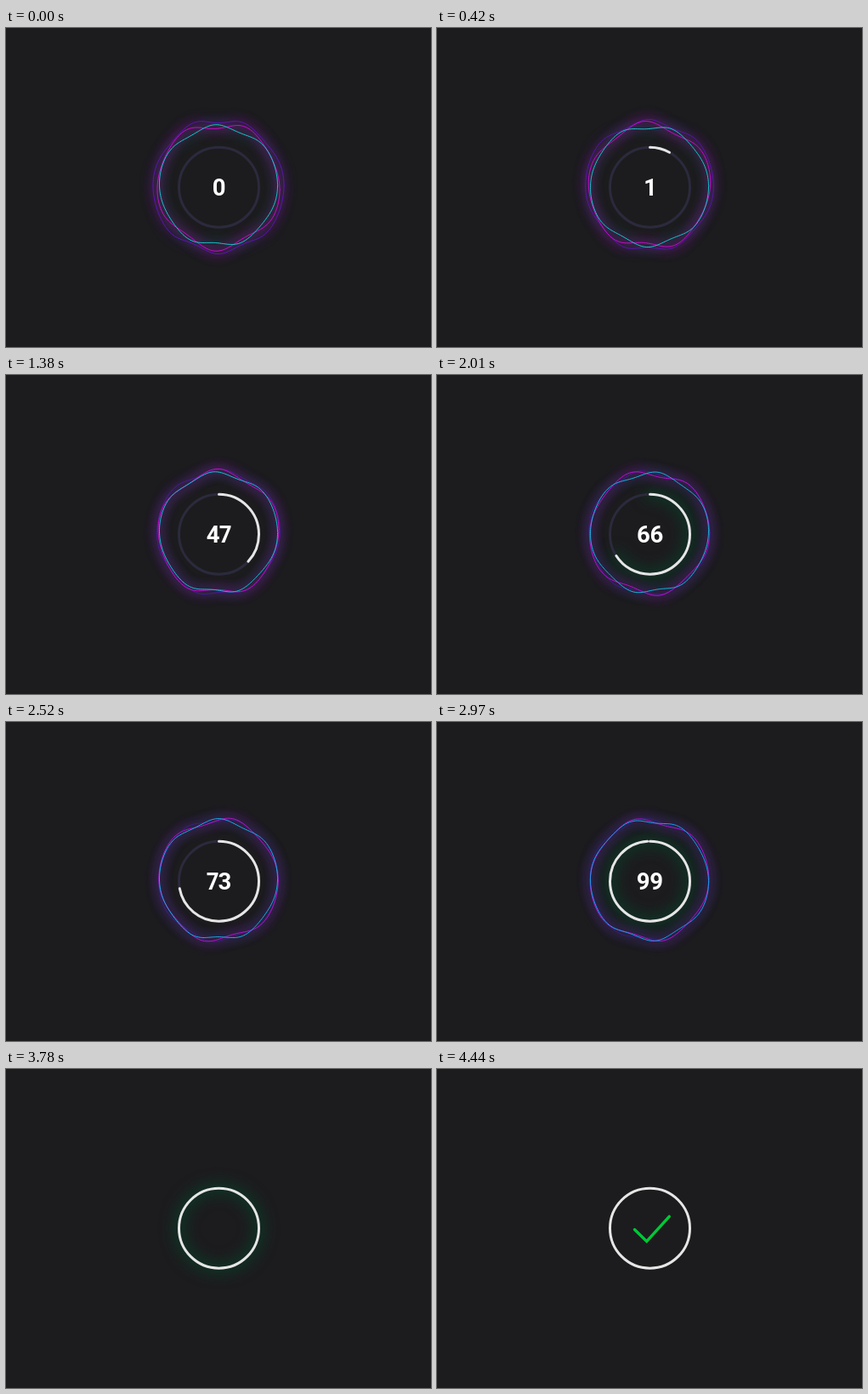
These frames come from a looping animation (500 by 375 pixels, 5.1 s). An HTML page with a canvas:

```html
<!DOCTYPE html>
<html lang="en">
<head>
<meta charset="utf-8">
<title>Progress ring</title>
<style>
  html, body { margin: 0; width: 100%; height: 100%; overflow: hidden; background: #1c1c1e; }
  canvas, svg { position: absolute; left: 0; top: 0; width: 500px; height: 375px; }
  text {
    font: 700 27.5px Roboto, "Noto Sans", sans-serif; font-variant-numeric: proportional-nums;
    letter-spacing: -.7px; fill: #fff; text-anchor: middle;
  }
</style>
</head>
<body>
<canvas id="stage" width="500" height="375"></canvas>
<svg viewBox="0 0 500 375"><text id="count" x="250.2" y="196.5">0</text></svg>
<script>
const LOOP = 5100, STEP = 30, TAU = Math.PI * 2, OFF = 2000;
const RING = { x: 250.5, y: 187.2, r: 47 };
const canvas = document.getElementById('stage');
const ctx = canvas.getContext('2d');
const count = document.getElementById('count');
const ratio = window.devicePixelRatio || 1;
canvas.width = 500 * ratio;
canvas.height = 375 * ratio;

const clamp = v => Math.min(1, Math.max(0, v));
const span = (t, from, to) => clamp((t - from) / (to - from));
const mix = (a, b, u) => a + (b - a) * u;
const quad = u => u < .5 ? 2 * u * u : 1 - 2 * (1 - u) ** 2;
const cubic = u => u < .5 ? 4 * u ** 3 : 1 - 4 * (1 - u) ** 3;

// start, end and target percentage of each push of the bar
const PUSHES = [[25, 1025, 33], [1070, 2070, 66], [2165, 3165, 100]];

// crest: x of an upward crest at t = 0; wave: length in px; period: ms per wave
const BLOBS = [
  { from: [98, 20, 195], to: [50, 45, 225], r: [77, 70], pow: 2, amp: [3, 2.4],
    crest: 280, wave: 60, period: 880, alpha: [.9, .3], glow: .2 },
  { from: [205, 12, 205], to: [184, 22, 214], r: [72, 69.5], pow: 1, amp: [4.7, 3.6],
    crest: 284, wave: 75, period: 904, alpha: [1, .95], glow: .36 },
  { from: [18, 205, 205], to: [18, 158, 250], r: [69.5, 69.5], pow: 1, amp: [2.5, 2.5],
    crest: 246, wave: 60, period: 278, alpha: [1, 1], glow: .15 }
];

const rgba = (c, a) => `rgba(${c.map(Math.round).join(',')},${a})`;

// Strokes the path outside the stage so only its blurred shadow lands on it.
function halo(path, color, width, blur) {
  ctx.save();
  ctx.shadowColor = color;
  ctx.shadowBlur = blur * ratio;
  ctx.shadowOffsetX = OFF * ratio;
  ctx.translate(-OFF, 0);
  ctx.lineWidth = width;
  ctx.strokeStyle = '#000';
  ctx.stroke(path);
  ctx.restore();
}

function line(path, color, width) {
  ctx.lineWidth = width;
  ctx.strokeStyle = color;
  ctx.stroke(path);
}

// A circle whose points are shifted up and down by a wave running to the right.
function blobPath(b, t, u) {
  const path = new Path2D();
  const r = mix(b.r[0], b.r[1], u), amp = mix(b.amp[0], b.amp[1], u);
  for (let i = 0; i < 240; i++) {
    const a = i / 240 * TAU;
    const x = 250 + r * Math.cos(a);
    const shift = amp * Math.cos(((x - b.crest) / b.wave - t / b.period) * TAU);
    path.lineTo(x, 185.6 + r * Math.sin(a) - shift);
  }
  path.closePath();
  return path;
}

function drawBlobs(t) {
  const show = 1 - span(t, 3450, 3780);
  if (!show) return;
  const p = span(t, 0, 3300);
  const shapes = BLOBS.map(b => ({
    path: blobPath(b, t, 1 - (1 - p) ** b.pow),
    color: b.from.map((v, i) => mix(v, b.to[i], p * p)),
    alpha: mix(b.alpha[0], b.alpha[1], p) * show,
    glow: b.glow * show * mix(1, .75, p)
  }));
  for (const s of shapes) halo(s.path, rgba(s.color, s.glow), 7, 14);
  for (const s of shapes) line(s.path, rgba(s.color, s.alpha), 1);
}

function arc(part) {
  const path = new Path2D();
  path.arc(RING.x, RING.y, RING.r, -TAU / 4, -TAU / 4 + TAU * part);
  return path;
}

function progress(t) {
  let value = 0;
  for (const [a, b, goal] of PUSHES) {
    if (t > a) value = mix(value, goal, cubic(span(t, a, b)));
  }
  return value;
}

function ringGlow(t) {
  return Math.max(...PUSHES.map(([a, b, goal]) => {
    const hold = goal === 100 ? 3810 : b;
    const fade = goal === 100 ? 500 : 240;
    return span(t, a + 400, a + 800) * (1 - span(t, hold, hold + fade));
  }));
}

function drawRing(t) {
  const value = progress(t), glow = ringGlow(t);
  const bar = arc(value / 100);
  if (glow && value) halo(bar, rgba([0, 80, 48], .5 * glow), 13, 16);
  ctx.lineCap = 'round';
  if (value < 100) line(arc(1), '#2b2a3d', 3);
  if (value > .05) line(bar, '#e6e6e6', 3);
}

function drawTick(t) {
  const u = quad(span(t, 3780, 4440));
  if (!u) return;
  const [a, b, c] = [[232.5, 188.7], [246.7, 202.6], [273.3, 173.4]];
  const first = Math.hypot(b[0] - a[0], b[1] - a[1]);
  const second = Math.hypot(c[0] - b[0], c[1] - b[1]);
  const len = u * (first + second);
  const path = new Path2D();
  const to = (p, q, k) => path.lineTo(mix(p[0], q[0], k), mix(p[1], q[1], k));
  path.moveTo(...a);
  to(a, b, clamp(len / first));
  if (len > first) to(b, c, (len - first) / second);
  line(path, '#00c837', 3.4);
}

function number(t) {
  return t < 2165 ? Math.round(66 * quad(span(t, 312, 2034))) : Math.ceil(progress(t));
}

function draw(t) {
  ctx.setTransform(ratio, 0, 0, ratio, 0, 0);
  ctx.fillStyle = '#1c1c1e';
  ctx.fillRect(0, 0, 500, 375);
  drawBlobs(t);
  drawRing(t);
  drawTick(t);
  count.textContent = number(t);
  count.style.opacity = 1 - span(t, 3450, 3780);
}

const start = performance.now();
function tick() {
  const t = (performance.now() - start) % LOOP;
  draw(Math.floor(t / STEP) * STEP);
  requestAnimationFrame(tick);
}
tick();
</script>
</body>
</html>
```
